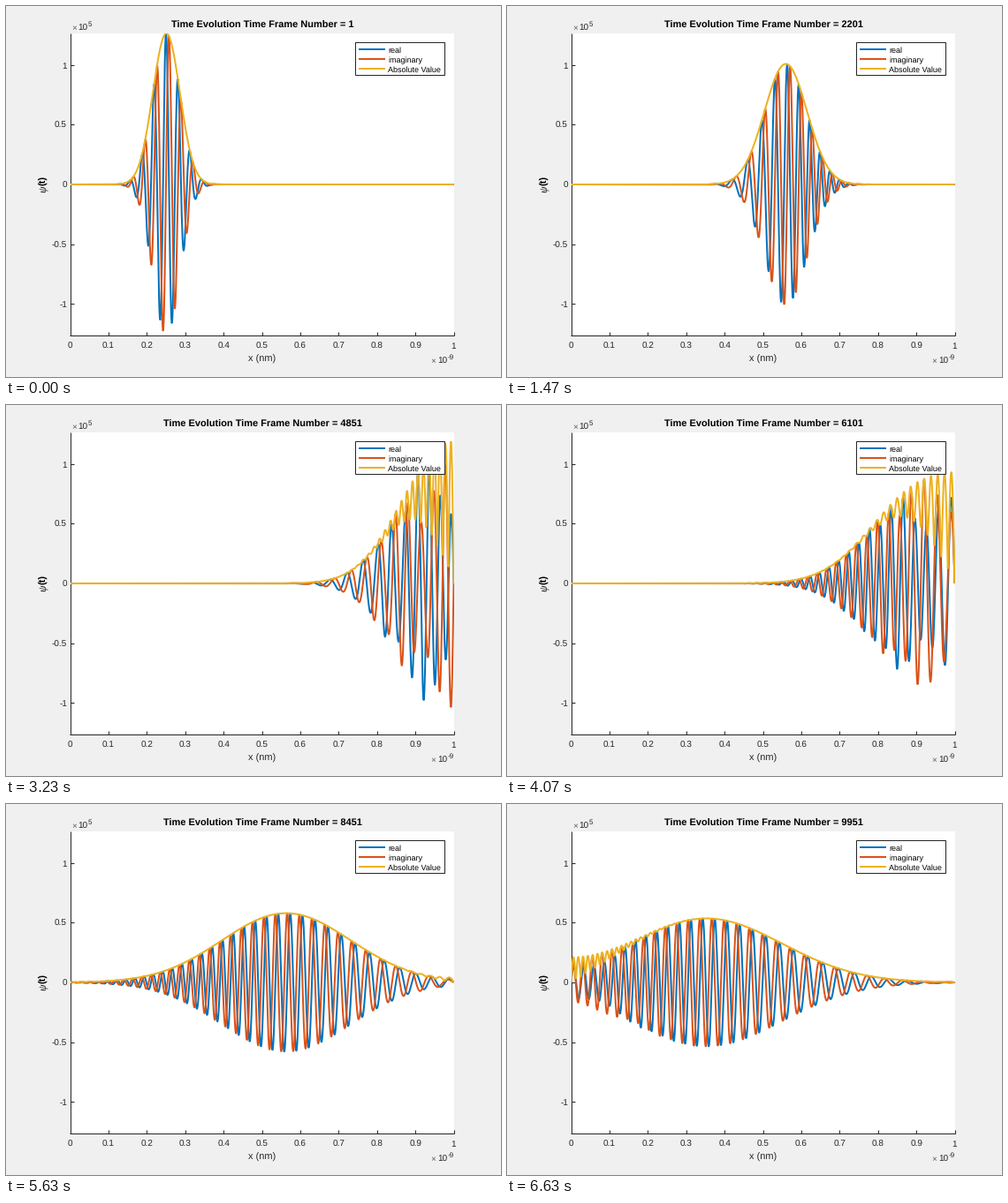
These frames come from a looping animation (560 px wide and 420 px high, 6660 ms). A matplotlib script:

```python
import numpy as np
import matplotlib.pyplot as plt
from matplotlib.animation import FuncAnimation
from matplotlib.patches import Rectangle

W, H, DPI = 560, 420, 100
PT = 72 / DPI
LOOP, TICK = 6660, 20

# Plot area in pixels
LEFT, RIGHT, TOP, BOTTOM = 72.5, 506.5, 31, 373
MID = (TOP + BOTTOM) / 2

# Wave packet in a box of unit length, on a grid of spacing DX
DX = 0.001
X0, SIGMA, K0 = 0.251, 0.025, 64 * np.pi
DIFF = 7.024e-7                  # hbar * dt / m per time step
PEAK = (2 * np.pi * (SIGMA * 1e-9) ** 2) ** -0.25 / 1e5
STEPS_PER_VIEW = 50

BACK, PAPER, INK = "#f0f0f0", "#ffffff", "#262626"
BLUE, ORANGE, YELLOW = "#0072bd", "#d95319", "#edb120"
SERIES = [("real", BLUE), ("imaginary", ORANGE), ("Absolute Value", YELLOW)]

plt.rcParams.update({"font.family": "Liberation Sans",
                     "text.hinting": "none"})
fig = plt.figure(figsize=(W / DPI, H / DPI), dpi=DPI, facecolor=BACK)
ax = fig.add_axes([0, 0, 1, 1])
ax.set_xlim(0, W)
ax.set_ylim(H, 0)
ax.axis("off")


def px(x):
    return LEFT + (RIGHT - LEFT) * x


def py(v):
    return MID - (BOTTOM - TOP) / 2 * v / PEAK


def text(x, y, s, size=10, ha="center", color=INK, **kw):
    return ax.text(x, y, s, fontsize=size * PT, ha=ha, color=color,
                   va=kw.pop("va", "baseline"), **kw)


def line(xs, ys, color=INK, width=1, **kw):
    return ax.plot(xs, ys, color=color, lw=width * PT,
                   solid_capstyle="butt", **kw)[0]


def draw_axes():
    area = Rectangle((LEFT, TOP), RIGHT - LEFT, BOTTOM - TOP, fc=PAPER, lw=0)
    ax.add_patch(area)
    base = BOTTOM - 0.5
    line([LEFT, LEFT], [TOP, BOTTOM], zorder=1.5)
    line([LEFT - 0.5, RIGHT + 0.5], [base, base], zorder=1.5)
    for i in range(11):
        x = px(i / 10)
        line([x, x], [base, base - 4], zorder=1.5)
        text(x, 388, f"{i / 10:g}")
    for v in (-1, -0.5, 0, 0.5, 1):
        line([LEFT, LEFT + 4], [py(v)] * 2, zorder=1.5)
        text(69, py(v) + 4, f"{v:g}", ha="right")
    for x, y, power in ((74, 28, "5"), (480.5, 405, "-9")):
        text(x, y, "×", ha="left", color="#606060")
        text(x + 7.5, y, "10", ha="left")
        text(x + 19, y - 5, power, 8, ha="left")
    text(290, 403, "x (nm)", 11)
    label = dict(rotation=90, va="center", color="black")
    text(42, 207.5, "ψ", 12, family="Liberation Serif", style="italic",
         **label)
    text(42, 197.5, "(t)", 11, weight="bold", **label)
    return area


def draw_legend():
    ax.add_patch(Rectangle((394.5, 40.5), 101, 37, fc=PAPER, ec=INK,
                           lw=PT, zorder=5))
    for i, (name, color) in enumerate(SERIES):
        y = 49 + 11 * i
        line([399, 429], [y, y], color, 2, zorder=6)
        text(432, y + 4, name, 9, ha="left", color="black", zorder=6)


# Expand the starting packet in the standing waves of the box
grid = np.linspace(0, 1, round(1 / DX) + 1)
start = PEAK * np.exp(-((grid - X0) / (2 * SIGMA)) ** 2 + 1j * K0 * grid)
wave_k = np.pi * np.arange(1, 161)
modes = np.sin(np.outer(grid, wave_k))
weights = 2 * DX * modes.T @ start
omega = DIFF * (1 - np.cos(wave_k * DX)) / DX ** 2


def packet(n):
    """Wave function after n time steps."""
    return modes @ (weights * np.exp(-1j * omega * n))


area = draw_axes()
draw_legend()
curves = [line(px(grid), py(0 * grid), color, 2, zorder=3)
          for _, color in SERIES]
for curve in curves:
    curve.set_clip_path(area)
title = text(290, 25, "", 11, color="black", weight="bold")


def update(i):
    # views change every 100/3 ms, rounded to 10 ms
    view = (3 * (2 * i + 1) + 1) // 10
    n = STEPS_PER_VIEW * view
    psi = packet(n)
    for curve, values in zip(curves, (psi.real, psi.imag, abs(psi))):
        curve.set_ydata(py(values))
    title.set_text(f"Time Evolution Time Frame Number = {n + 1}")
    return [*curves, title]


anim = FuncAnimation(fig, update, frames=LOOP // TICK, interval=TICK,
                     repeat=True, repeat_delay=0, blit=False)
plt.show()
```
